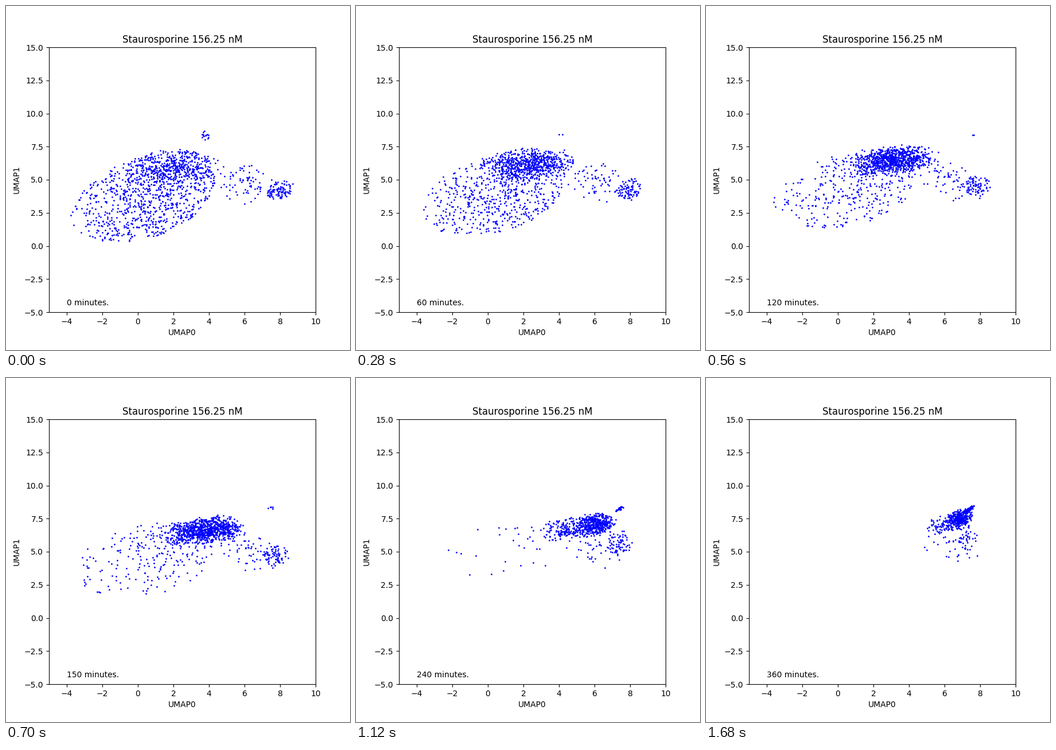
A matplotlib script that plays this animation: 600 by 600 pixels, repeating every 1820 ms.

```python
import numpy as np
import matplotlib.pyplot as plt
from matplotlib.animation import FuncAnimation

FRAMES = 13
rng = np.random.default_rng(12)


def lerp(a, b, p):
    return a + (b - a) * p


def logistic(t, mid, width):
    return 1 / (1 + np.exp(-(t - mid) / width))


def smooth(p):
    p = np.clip(p, 0, 1)
    return p * p * (3 - 2 * p)


class Swarm:
    """Cells wandering around a centre; their spread stays the same."""

    def __init__(self, size):
        self.u = rng.random(size)
        walk = np.cumsum(rng.normal(0, 0.5, (FRAMES, size)), axis=0)
        self.angle = rng.uniform(0, 2 * np.pi, size) + walk

    def offsets(self, i, sx, sy, shear, flat=False):
        # flat: uniform disc, otherwise a normal cut at about two sigma
        r = np.sqrt(self.u) if flat else np.sqrt(-2 * np.log(1 - 0.89 * self.u))
        dx = sx * r * np.cos(self.angle[i])
        if flat:
            dx *= np.where(dx < 0, 1 + 0.3 * r**4, 1)   # thin left fringe
        return dx, shear * dx + sy * r * np.sin(self.angle[i])

    def cloud(self, i, count, cx, cy, sx, sy, shear=0):
        dx, dy = self.offsets(i, sx, sy, shear)
        n = int(round(count))
        return cx + dx[:n], cy + dy[:n]


CELLS = 1230
body, band = Swarm(CELLS), Swarm(CELLS)
leave = rng.normal(1.3, 3.4, CELLS)             # when a cell leaves the body
speed = 1 - 0.5 * rng.random(CELLS) ** 2.2      # slow cells trail behind
lower, bridge, top, tip = (Swarm(n) for n in (100, 70, 14, 100))


def migrate(i):
    """Cells leave the healthy body and travel in a band to the upper right."""
    bx, by = body.offsets(i, 3.55, 3.2 - 0.1 * i, 0.35 - 0.03 * i, flat=True)
    p = logistic(i, 5, 1.6)
    dx, dy = band.offsets(i, lerp(1.4, 0.32, p), lerp(0.62, 0.32, i / 12), 0.08)
    t = i * speed
    x = lerp(1.8, 6.95, logistic(t, 5, 1.6)) + dx
    y = lerp(5.85, 7.65, (t / 12) ** 0.8) + dy
    gone = smooth((i - leave) / 1.5)
    alive = int(400 + 830 * logistic(-i, -7, 1.2))
    return (lerp(0.8 + bx, x, gone)[:alive],
            lerp(3.9 + 0.12 * i + by, y, gone)[:alive])


def cells(i):
    s = i / (FRAMES - 1)
    p = logistic(i, 6.5, 1.6)
    return np.hstack([
        migrate(i),
        lower.cloud(i, lerp(95, 50, s), lerp(7.95, 7.2, p), lerp(4.15, 6.2, p),
                    lerp(0.38, 0.3, s), lerp(0.36, 0.6, s), lerp(0.4, -0.5, s)),
        bridge.cloud(i, lerp(70, 28, s), lerp(6, 6.4, s), lerp(4.7, 5.5, s),
                     0.85, 0.75, -0.1),
        top.cloud(i, 14 * np.exp(-i), 3.85, 8.4, 0.2, 0.18, 0.4),
        tip.cloud(i, 100 * s**3.5, lerp(7.55, 7.36, s), lerp(8.4, 8.2, s),
                  lerp(0.06, 0.17, s), 0.07, 0.8 * s),
    ])


plt.rcParams["text.kerning_factor"] = 6
fig, ax = plt.subplots(figsize=(6, 6), dpi=100)
ax.set(xlim=(-5, 10), ylim=(-5, 15), xlabel="UMAP0", ylabel="UMAP1",
       title="Staurosporine 156.25 nM")
dots, = ax.plot([], [], "b.", markersize=2)
clock = ax.text(-4, -4.5, "")


def draw(i):
    dots.set_data(*cells(i))
    clock.set_text(f"{30 * i} minutes.")
    return dots, clock


anim = FuncAnimation(fig, draw, frames=FRAMES, interval=140, repeat=True,
                     repeat_delay=0)
plt.show()
```
